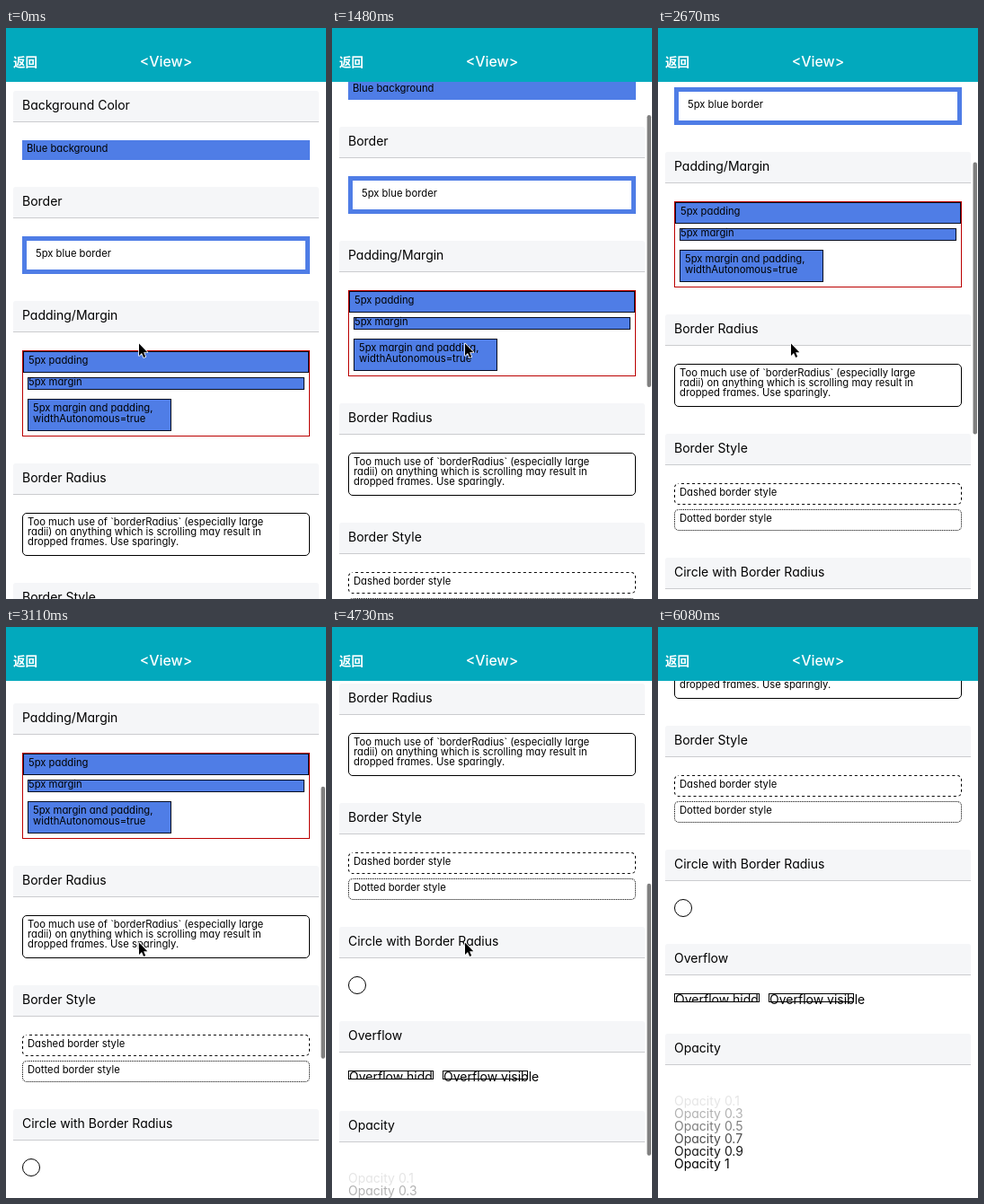
An HTML page that plays this animation: 356x636 px, repeating every 7.13 s.

```html
<!DOCTYPE html>
<html lang="en">
<head>
<meta charset="utf-8">
<title>View</title>
<style>
  html, body { margin: 0; width: 100%; height: 100%; overflow: hidden; background: #fff; }
  svg { display: block; width: 100%; height: 100%; }
  text { font-family: Inter, Lato, sans-serif; font-feature-settings: "cv11"; white-space: pre; }
  .title { font-size: 14px; }
  .small { font-size: 11.25px; }
  .line { fill: none; stroke: #000; }
  .blue { fill: #4f7de6; }
  .nav { font-size: 15.9px; font-weight: 500; fill: #fff; }
  .back { font: 700 13.5px "Noto Sans CJK SC", "Noto Sans CJK", sans-serif; fill: #fff; }
</style>
</head>
<body>
<svg viewBox="0 0 356 636">
  <defs>
    <clipPath id="inner"><rect x="19" y="917" width="93" height="8"/></clipPath>
    <clipPath id="broken">
      <rect x="18" y="673" width="320" height="24" rx="5"/>
      <rect x="18" y="702" width="320" height="24" rx="5"/>
    </clipPath>
  </defs>
  <g id="page"></g>
  <rect id="bar" x="350.5" width="4.5" height="303" rx="2.25" fill="#7f7f7f"/>
  <rect width="356" height="60" fill="#02a9bd"/>
  <text class="back" x="8" y="43">返回</text>
  <text class="nav" x="178" y="43" text-anchor="middle">&lt;View&gt;</text>
  <path id="cursor" d="M148 351.5v13.4l3-2.8 2.2 4.8 2-.9-2.1-4.7h4.2z"
    stroke="#fff" stroke-width="1.6" stroke-linejoin="round" paint-order="stroke"/>
</svg>
<script>
const LOOP = 7130;
const SVG = "http://www.w3.org/2000/svg";
const byId = id => document.getElementById(id);
const page = byId("page"), bar = byId("bar"), cursor = byId("cursor");

function add(tag, attrs, content = "") {
  const el = document.createElementNS(SVG, tag);
  for (const name in attrs) el.setAttribute(name, attrs[name]);
  el.textContent = content;
  return page.appendChild(el);
}
const label = (x, y, content, cls = "small", extra = {}) =>
  add("text", { x, y, class: cls, ...extra }, content);

// A rectangle given by its outer edges, with the stroke drawn inside them
function box(left, top, right, bottom, extra = {}) {
  const w = extra["stroke-width"] || 1;
  return add("rect", {
    x: left + w / 2, y: top + w / 2,
    width: right - left - w, height: bottom - top - w,
    class: "line", ...extra
  });
}
// Dashes run along the outer edge, begin with a gap and close up evenly
function brokenBox(top, dash) {
  const length = 2 * (310 + 14) + 10 * Math.PI;
  const gap = dash + 2 * dash * dash / length;
  add("rect", {
    x: 18, y: top, width: 320, height: 24, rx: 5, class: "line",
    "stroke-width": 2, "stroke-dasharray": `${dash} ${gap}`,
    "stroke-dashoffset": dash, "clip-path": "url(#broken)"
  });
}
function heading(top, content) {
  add("path", { d: `M8 ${top + 35}v-32q0-3 3-3h334q3 0 3 3v32z`, fill: "#f5f6f8" });
  add("rect", { x: 8, y: top + 34, width: 340, height: 1, fill: "#cbcccf" });
  label(18, top + 21, content, "title");
}

heading(70, "Background Color");
add("rect", { x: 18, y: 125, width: 320, height: 22, class: "blue" });
label(23, 138, "Blue background");

heading(177, "Border");
box(18, 232, 338, 274, { "stroke-width": 5, style: "stroke:#4f7de6" });
label(33, 255, "5px blue border");

heading(304, "Padding/Margin");
box(18, 359, 338, 455, { style: "stroke:#b00" });
const filled = { style: "fill:#4f7de6;stroke:#070d20" };
box(19, 360, 337, 384, filled);
box(24, 389, 332, 403, filled);
box(24, 413, 184, 449, filled);
label(25, 374, "5px padding");
label(25, 398, "5px margin");
label(30, 427, "5px margin and padding,");
label(30, 439, "widthAutonomous=true");

heading(485, "Border Radius");
box(18, 540, 338, 588, { rx: 4.5 });
[
  "Too much use of `borderRadius` (especially large",
  "radii) on anything which is scrolling may result in",
  "dropped frames. Use sparingly."
].forEach((line, i) => label(24, 554 + 11 * i, line));

heading(618, "Border Style");
brokenBox(673, 3);
brokenBox(702, 1);
label(24, 687, "Dashed border style");
label(24, 716, "Dotted border style");

heading(756, "Circle with Border Radius");
add("circle", { cx: 28, cy: 821, r: 9.5, class: "line" });

heading(861, "Overflow");
box(18, 916, 113, 926);
label(19, 928, "Overflow hidden", "title", { "clip-path": "url(#inner)" });
box(123, 916, 218, 926);
label(124, 928, "Overflow visible", "title");

heading(961, "Opacity");
[0.1, 0.3, 0.5, 0.7, 0.9, 1].forEach((opacity, i) =>
  label(18, 1041 + 14 * i, "Opacity " + opacity, "title", { opacity }));

// Each swipe runs in even steps and passes through one middle position
const swipes = [
  { start: 1040, end: 2080, steps: 8, from: 0, midStep: 4, mid: 67, to: 128 },
  { start: 2380, end: 3840, steps: 11, from: 128, midStep: 6, mid: 219, to: 304 },
  { start: 4290, end: 5330, steps: 8, from: 304, midStep: 4, mid: 422, to: 508 }
];
function swipeAt(s, t) {
  const gap = (s.end - s.start) / (s.steps - 1);
  const step = Math.min(s.steps, Math.floor((t - s.start) / gap + 0.05) + 1);
  if (step <= s.midStep)
    return s.from + (s.mid - s.from) * (step / s.midStep) ** 1.25;
  const rest = (s.steps - step) / (s.steps - s.midStep);
  return s.to - (s.to - s.mid) * rest ** 1.3;
}
function scrollAt(t) {
  const swipe = swipes.filter(s => t >= s.start).pop();
  return swipe ? Math.round(swipeAt(swipe, t)) : 0;
}

function draw(t) {
  const y = scrollAt(t);
  page.setAttribute("transform", `translate(0 ${-y})`);
  bar.setAttribute("y", 61.3 + 0.532 * y);
  bar.setAttribute("opacity", t < 1040 || t >= 6080 ? 0 : t < 5930 ? 1 : 0.5);
  cursor.setAttribute("opacity", t < 6080 ? 1 : 0);
}

const begin = performance.now();
function tick() {
  draw((performance.now() - begin) % LOOP);
  requestAnimationFrame(tick);
}
draw(0);
requestAnimationFrame(tick);
</script>
</body>
</html>
```
